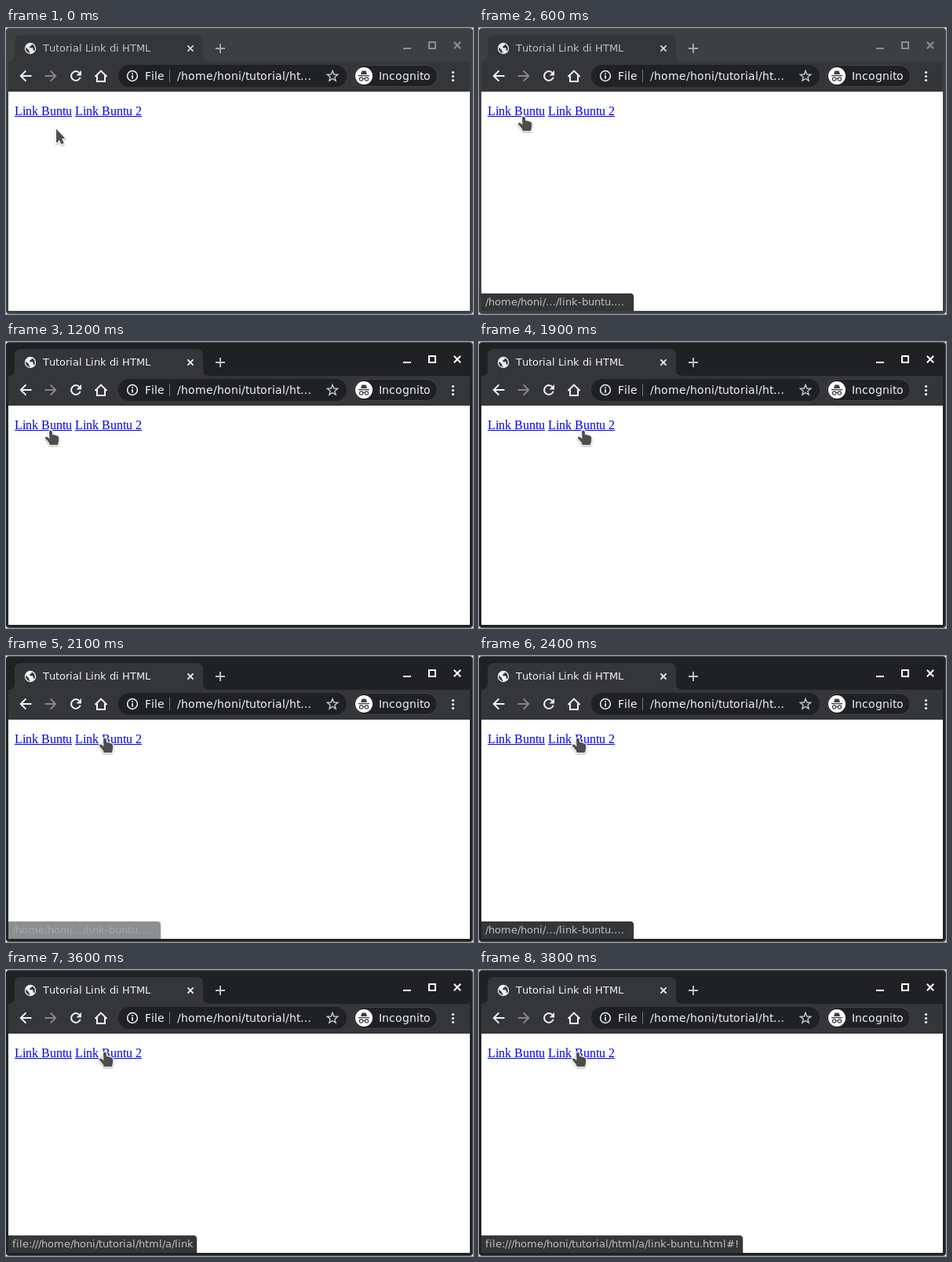
An HTML page with a canvas for the animation above (4.1 s loop, 595 px wide and 364 px high).

```html
<!DOCTYPE html>
<html lang="id">
<head>
<meta charset="utf-8">
<title>Tutorial Link di HTML</title>
<style>
html, body { margin: 0; width: 100%; height: 100%; overflow: hidden; background: #fff; }
canvas { display: block; width: 595px; height: 364px; }
</style>
</head>
<body>
<canvas id="stage" width="595" height="364"></canvas>
<script>
const ctx = document.getElementById('stage').getContext('2d');
const LOOP = 4100;
const SANS = '"DejaVu Sans", sans-serif';
const SERIF = '"Liberation Serif", serif';
const TOOLBAR = '#35363a', DARK = '#202124', INK = '#f1f3f4';
const SHORT_URL = '/home/honi/…/link-buntu.…';
const LONG_URL = 'file:///home/honi/tutorial/html/a/link-buntu.html#!';

// Each track is a list of [start time, value]; the last one begun holds.
const tracks = {
  arrow: [[0, [64, 128]], [100, [61, 123]], [200, [57, 116]], [400, null]],
  hand: [[0, null], [400, [0, 0]], [1400, [38, -9]], [1500, [69, -15]],
         [1800, [73, -6]], [1900, [76, 0]], [2000, [72, -5]], [2100, [69, -8]]],
  active: [[0, false], [700, true]],
  pressed: [[0, 0], [800, 1], [1000, 0], [2200, 2], [2400, 0], [2700, 2], [3000, 0]],
  alpha: [[0, 0], [500, 0.5], [600, 1], [1000, 0.7], [1100, 0.3], [1200, 0], [2100, 0.5], [2200, 1]],
  width: [[0, 194], [3600, 240], [3700, 305], [3800, 333]]
};

function at(name, t) {
  let value;
  for (const [start, v] of tracks[name]) if (t >= start) value = v;
  return value;
}

function rect(x, y, w, h, color) {
  ctx.fillStyle = color;
  ctx.fillRect(x, y, w, h);
}

function round(x, y, w, h, r, color) {
  ctx.beginPath();
  ctx.roundRect(x, y, w, h, r);
  ctx.fillStyle = color;
  ctx.fill();
}

function disc(x, y, r, color) {
  ctx.beginPath();
  ctx.arc(x, y, r, 0, Math.PI * 2);
  ctx.fillStyle = color;
  ctx.fill();
}

function ring(x, y, r, color, weight) {
  ctx.beginPath();
  ctx.arc(x, y, r, 0, Math.PI * 2);
  ctx.strokeStyle = color;
  ctx.lineWidth = weight;
  ctx.stroke();
}

function stroke(d, color, weight) {
  ctx.strokeStyle = color;
  ctx.lineWidth = weight;
  ctx.stroke(new Path2D(d));
}

function fill(d, color) {
  ctx.fillStyle = color;
  ctx.fill(new Path2D(d));
}

// Whole-pixel advances, as in hinted desktop text.
function text(str, x, y, font, color) {
  ctx.font = font;
  ctx.fillStyle = color;
  for (const ch of str) {
    ctx.fillText(ch, x, y);
    x += Math.round(ctx.measureText(ch).width);
  }
  return x;
}

function cross(x, y, r, color, weight) {
  stroke(`M${x - r} ${y - r}L${x + r} ${y + r}M${x + r} ${y - r}L${x - r} ${y + r}`, color, weight);
}

function drawFrame(active) {
  const base = active ? DARK : '#3c4043';
  rect(0, 0, 595, 364, '#fff');
  round(0, 0, 595, 364, 4, '#4b4e51');
  round(0, 1, 594, 362, 4, base);
  rect(3, 43, 588, 38, TOOLBAR);
  rect(3, 81, 588, 279, '#fff');
  fill('M3 43Q11 43 11 35V17Q11 9 19 9H243Q251 9 251 17V35Q251 43 259 43Z', TOOLBAR);

  const title = active ? '#f1f3f4' : '#bdc1c6';
  globe(31, 26, active ? '#f1f3f4' : '#e8eaed');
  text('Tutorial Link di HTML', 47, 30, '13px ' + SANS, title);
  cross(235, 26, 3.6, active ? INK : '#d5d7da', 1.8);
  stroke('M267 26H279M273 20V32', active ? '#c1c3c6' : '#a5a8ab', 1.9);

  const button = active ? '#fff' : '#8d9093';
  rect(506, 25, 10, 2, button);
  ctx.strokeStyle = button;
  ctx.lineWidth = 2;
  ctx.strokeRect(539, 18, 8, 8);
  cross(575, 22, 4.2, button, 2);
}

function globe(x, y, color) {
  disc(x, y, 7.2, color);
  ctx.save();
  ctx.translate(x, y);
  fill('M-5.6 -1.5L-1.8 2.2V3.4Q-1.6 4.6 -.4 4.8V5.9Q-5 5.2 -5.8 1Z', TOOLBAR);
  fill('M1.8 -5.6Q2 -3.4 .2 -3.2L-.8 -2.2V-.8H2.6Q3.6 -.6 3.6 .6V2.4Q4.6 2.4 5 3.2Q7.6 -2.8 1.8 -5.6Z', TOOLBAR);
  ctx.restore();
}

function backArrow(x, color, dir) {
  ctx.save();
  ctx.translate(x, 61);
  ctx.scale(dir, 1);
  stroke('M7.5 0H-6M.4 -6.6L-6.2 0L.4 6.6', color, 2);
  ctx.restore();
}

function star(x, y) {
  ctx.beginPath();
  for (let i = 0; i < 10; i++) {
    const a = i * Math.PI / 5 - Math.PI / 2, r = i % 2 ? 3 : 7;
    ctx.lineTo(x + r * Math.cos(a), y + 0.5 + r * Math.sin(a));
  }
  ctx.closePath();
  ctx.strokeStyle = '#c8cacd';
  ctx.lineWidth = 1.4;
  ctx.stroke();
}

function drawToolbar() {
  const font = '14px ' + SANS;
  backArrow(25, INK, 1);
  backArrow(57, '#86878a', -1);

  ctx.beginPath();
  ctx.arc(89, 61, 5.9, 0.3, Math.PI * 1.75);
  ctx.strokeStyle = INK;
  ctx.lineWidth = 2;
  ctx.stroke();
  fill('M96 54V60.4H89.6Z', INK);

  stroke('M113.5 62L121 54.6L128.5 62M116 60.5V68H126V60.5', INK, 2);

  round(143, 47, 291, 28, 14, DARK);
  ring(161, 61, 6.4, INK, 1.5);
  rect(160.2, 60, 1.7, 4.6, INK);
  rect(160.2, 57.2, 1.7, 1.7, INK);
  text('File', 177, 66, font, INK);
  rect(208, 53, 1, 16, '#717377');
  text('/home/honi/tutorial/ht…', 218, 66, font, INK);
  star(416, 61);

  round(443, 47, 107, 28, 14, '#43454a');
  round(444, 48, 105, 26, 13, DARK);
  disc(456, 61, 11, '#fff');
  fill('M452 59L453.4 54.5H458.6L460 59Z', '#3c4043');
  rect(449, 60, 14, 1.3, '#3c4043');
  ring(452.6, 65, 2.2, '#3c4043', 1.2);
  ring(459.4, 65, 2.2, '#3c4043', 1.2);
  stroke('M454.8 64.6Q456 64 457.2 64.6', '#3c4043', 1.1);
  text('Incognito', 475, 66, font, INK);

  for (const y of [56, 61, 66]) disc(569.5, y + 0.5, 1.6, INK);
}

function link(str, x, pressed) {
  const color = pressed ? '#f00' : '#00e';
  const end = text(str, x, 111, '16px ' + SERIF, color);
  rect(x, 112, end - x, 1, color);
  return end;
}

function drawStatus(width, alpha) {
  if (!alpha) return;
  ctx.save();
  ctx.globalAlpha = alpha;
  round(3, 337, width + 1, 23, [0, 5, 0, 0], 'rgba(0,0,0,.18)');
  round(3, 338, width, 22, [0, 4, 0, 0], TOOLBAR);
  ctx.beginPath();
  ctx.rect(3, 338, width - 5, 22);
  ctx.clip();
  text(width > 194 ? LONG_URL : SHORT_URL, 8, 353, '13px ' + SANS, '#bdc1c6');
  ctx.restore();
}

const ARROW = 'M0 .5L11.2 12.2L7.2 13L9.8 18.6L6.6 20L4 14.8L0 18.6Z';
const HAND = 'M55 114.5Q55 112.6 56.8 112.6Q58.6 112.6 58.8 114.5L59.2 118.2' +
  'Q61 117.2 62 118.8Q64 118 64.8 119.6Q67.2 119.2 67.2 121.6V125.5' +
  'Q67 128 65.8 131H55.8Q55.2 128.2 52.6 125.6L50 122.6Q49.4 120.8 51.4 120.6Q53 120.8 55.4 123.2Z';

function cursor(shape, pos) {
  if (!pos) return;
  const path = new Path2D(shape);
  ctx.save();
  ctx.translate(pos[0], pos[1]);
  ctx.lineJoin = 'round';
  ctx.shadowColor = 'rgba(0,0,0,.35)';
  ctx.shadowBlur = 2;
  ctx.shadowOffsetY = 1;
  ctx.strokeStyle = '#fff';
  ctx.lineWidth = 2.2;
  ctx.stroke(path);
  ctx.shadowColor = 'transparent';
  ctx.fillStyle = '#4d4d4d';
  ctx.fill(path);
  ctx.restore();
}

function draw(now) {
  const t = now % LOOP;
  const pressed = at('pressed', t);
  drawFrame(at('active', t));
  drawToolbar();
  const end = link('Link Buntu', 11, pressed === 1);
  link('Link Buntu 2', end + 4, pressed === 2);
  drawStatus(at('width', t), at('alpha', t));
  cursor(ARROW, at('arrow', t));
  cursor(HAND, at('hand', t));
  requestAnimationFrame(draw);
}

draw(0);
</script>
</body>
</html>
```
